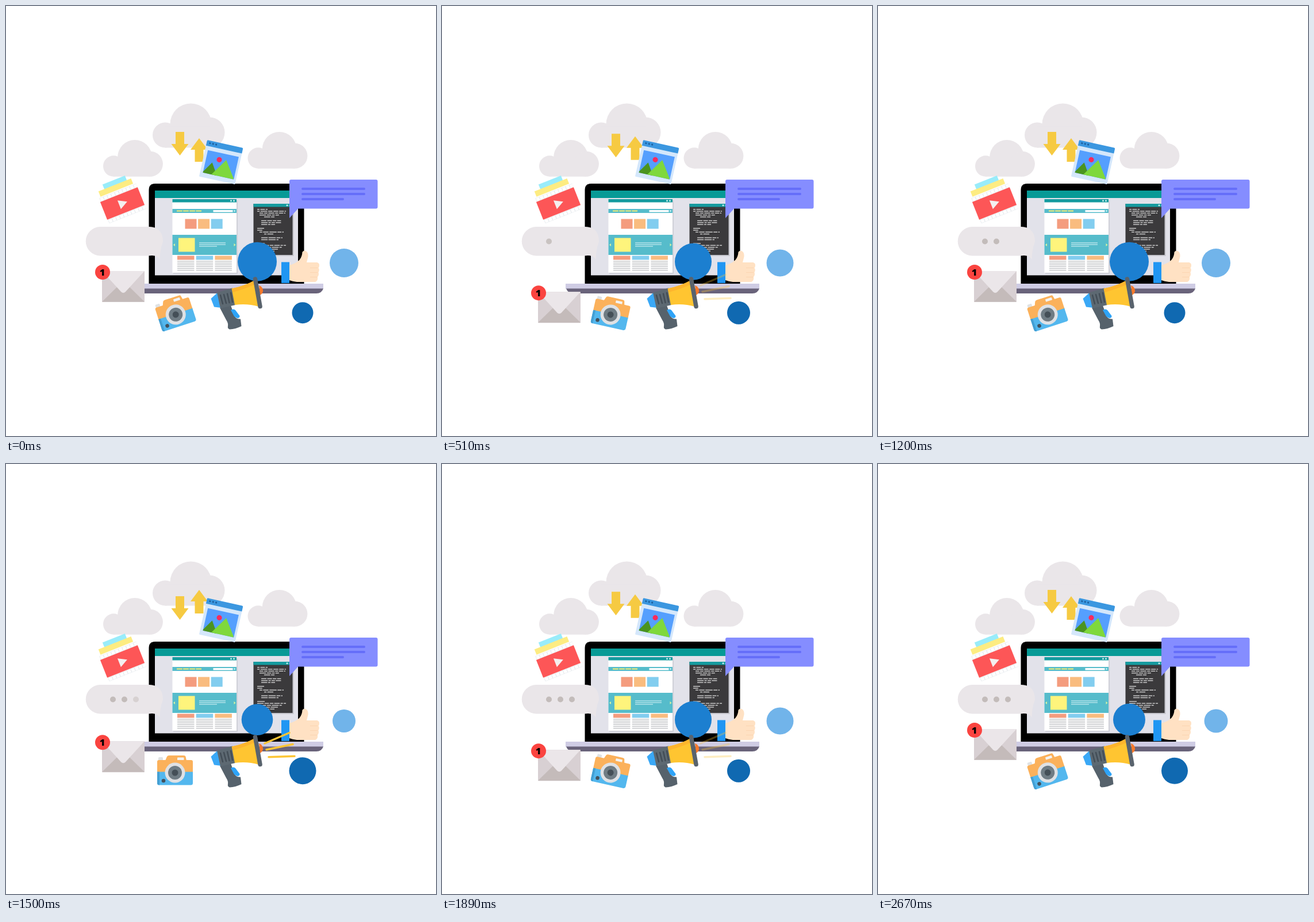
An HTML page for the animation above (2.7 s loop, 748x748 px).

```html
<!DOCTYPE html>
<html lang="en">
<head>
<meta charset="utf-8">
<title>Online marketing</title>
<style>
  html, body { margin: 0; width: 100%; height: 100%; overflow: hidden; background: #fff; }
  svg { display: block; width: 100vw; height: 100vh; }
</style>
</head>
<body>
<svg viewBox="0 0 748 748">
  <defs>
    <g id="cloud" fill="#eae6e9">
      <circle cx="22" cy="55" r="22"/><circle cx="66.500" cy="36" r="36"/><circle cx="99" cy="50.500" r="26.500"/>
      <rect x="22" y="40" width="77" height="37"/>
    </g>
    <path id="arrow" d="M-7.500 0H7.500V21H15L0 41L-15 21H-7.500Z" fill="#f6ca42"/>
  </defs>

  <use href="#cloud" x="255" y="169.500"/>
  <use href="#cloud" transform="translate(169 233) scale(.828)"/>
  <use href="#cloud" transform="translate(420.500 219) scale(.828)"/>
  <use id="down" href="#arrow"/>
  <use id="up" href="#arrow"/>

  <g id="laptop">
    <path d="M248.500 483.500V320Q248.500 309 259.500 309H507.500Q518.500 309 518.500 320V483.500Z"/>
    <rect x="259" y="321" width="249" height="147.500" fill="#e2e2ea"/>
    <rect x="259" y="321" width="249" height="13" fill="#079a96"/>
    <path d="M215 483H552V492H215Z" fill="#cfcce4"/>
    <path d="M216 491.500H552Q549 500 540 500H228Q219 500 216 491.500Z" fill="#69637a"/>
  </g>

  <g id="page">
    <rect x="291" y="338" width="112" height="128" fill="#cfd0d8"/>
    <rect x="289.500" y="336" width="111.500" height="128" fill="#fff"/>
    <rect x="289.500" y="336" width="111.500" height="5.500" fill="#159b9f"/>
    <circle cx="391.500" cy="338.700" r="1.500" fill="#c9f0ec"/><circle cx="396.500" cy="338.700" r="1.500" fill="#c9f0ec"/>
    <path d="M289.500 353H401V360H289.500ZM289.500 398H401V433H289.500Z" fill="#56bccb"/>
    <path d="M297 356.500H340" stroke="#f1ee76" stroke-width="2" stroke-dasharray="9.800 1.300"/>
    <rect x="360.500" y="355" width="34" height="3.500" fill="#fff"/>
    <circle cx="397.500" cy="356.500" r="1.300" fill="#dff"/>
    <rect x="300" y="403.500" width="28.500" height="24" fill="#fef47c"/>
    <path d="M294 413V418L291 415.500ZM396.500 413V418L399.500 415.500Z" fill="#d7f5a0"/>
    <path d="M336 412H382M336 415H382M336 418H367" stroke="#b5e4ea" stroke-width="1.300"/>
  </g>
  <g id="code">
    <rect x="432" y="346" width="68.500" height="89" fill="#c5c5cc"/>
    <rect x="430.500" y="344" width="68" height="89" fill="#3b3a3c"/>
    <rect x="430.500" y="344" width="68" height="5.500" fill="#159b9f"/>
    <circle cx="489" cy="346.700" r="1.500" fill="#c9f0ec"/><circle cx="494" cy="346.700" r="1.500" fill="#c9f0ec"/>
  </g>

  <g transform="translate(350 233) rotate(12.500)">
    <rect y="9" width="64" height="56" rx="1" fill="#d4e7fb"/>
    <path d="M2 0H62Q64 0 64 2V10H0V2Q0 0 2 0Z" fill="#3b97e0"/>
    <circle cx="6" cy="4.500" r="1.600" fill="#1d5f9e"/><circle cx="11.500" cy="4.500" r="1.600" fill="#1d5f9e"/><circle cx="17" cy="4.500" r="1.600" fill="#1d5f9e"/>
    <rect x="5" y="17" width="55" height="40" fill="#559ffe"/>
    <path d="M5 55L17 36.500L30 57H5Z" fill="#4b941f"/>
    <path d="M20 57L40 27L59 55V57Z" fill="#7fd83c"/>
    <circle cx="28" cy="29" r="4.600" fill="#f92b5d"/>
  </g>

  <g transform="translate(202.500 343.500) rotate(-21.700)">
    <rect x="-20" y="-43.500" width="42" height="10" fill="#99ecfa"/>
    <rect x="-31" y="-35" width="61" height="11" fill="#fdec82"/>
    <rect x="-35" y="-25" width="70" height="50" fill="#fff"/>
    <path d="M-34 -20H35M-34 20.500H35" stroke="#e9edf0" stroke-width="7"/>
    <path d="M-33 -20H35M-33 20.500H35" stroke="#fff" stroke-width="5.500" stroke-dasharray="5.500 1.500"/>
    <rect x="-35" y="-16.500" width="70" height="33" fill="#fd5657"/>
    <path d="M-6 -8L9 0L-6 8Z" fill="#f4efef"/>
  </g>

  <path d="M164 384H248Q273 384 273 410Q267 427 268 441Q262 432 248 434.500H164A25 25 0 0 1 164 384Z" fill="#eae6e9"/>
  <g id="dots" fill="#c3bcba">
    <circle cx="186" cy="409.500" r="5"/><circle cx="206" cy="409.500" r="5"/><circle cx="226" cy="409.500" r="5"/>
  </g>

  <path d="M496 302H643.500Q646.500 302 646.500 305V349.500Q646.500 352.500 643.500 352.500H508L493 369V305Q493 302 496 302Z" fill="#858dff"/>
  <path d="M516 318H623M516 327H623M516 336H586" stroke="#656ef9" stroke-width="4" stroke-linecap="round"/>

  <circle id="blue" cx="437" cy="444.700" fill="#1c7fd0"/>
  <circle id="sky" cx="588" cy="447" fill="#71b4ea"/>
  <circle id="navy" cx="516" cy="533.700" fill="#1069b1"/>

  <rect x="479" y="445.500" width="14" height="36.500" fill="#2096f3"/>
  <path d="M493 451Q505 448 511 441Q515 436 515.500 428Q518 424.500 522 426.500Q526 429 525.500 436L523 446H541Q545 447 545 451Q545 454 543.500 455.500Q546 459 543.500 463.500Q545 468 542 471.500Q543 478 538 480H506Q498 479 493 477Z" fill="#ffe1c3"/>
  <path d="M529 455.500H542M529 463.500H542M529 471.500H541" stroke="#fbd5b2" stroke-width="1"/>

  <path id="rays" d="M450 486L493 467.500M453 497L499 487.500M457 509.700L502 508.300" stroke="#fcc535" stroke-width="3.500" stroke-linecap="round"/>

  <g id="horn">
    <path d="M440 486Q446 488 447 494Q447.500 500 442 503Z" fill="#f5792c"/>
    <path d="M372 525L391 521L398 540Q401 545 408 544.500L409.500 557Q399 562 389 562.500Q385 561 386 557Q387 552 383 546Z" fill="#56626c"/>
    <path d="M391 529Q396 526 399 529L406.500 539Q407 543 402 543L397 540Z" fill="#2ea3f7"/>
    <path d="M368 498.500L375 525L362 523.500L356.500 509Z" fill="#3aa8f6"/>
    <path d="M367 498.500L394 490.500L399 520L373 526Z" fill="#5d6972"/>
    <path d="M373 503L377 518M379 502L383 517M385 500.500L388.500 516M391 499L394 515" stroke="#434d56" stroke-width="2.500" stroke-linecap="round"/>
    <path d="M392.500 491.500Q415 487 433 477L440 523Q420 517 398 520Z" fill="#ffc531"/>
    <path d="M393 491.500Q415 487 433 477L434 484Q416 492 394.500 498Z" fill="#feb52d"/>
    <path d="M433.500 475L442 522.500" stroke="#59636d" stroke-width="7.500" stroke-linecap="round"/>
  </g>

  <g id="mail">
    <rect x="167" y="461" width="74" height="54" rx="1" fill="#d8d0d3"/>
    <path d="M167 514.500L193 489H215L241 514.500Z" fill="#c4bbba"/>
    <path d="M167 461H241L208 497Q204 501 200 497Z" fill="#ebe6e9"/>
    <circle cx="168" cy="463" r="13" fill="#fa4440"/>
    <text x="167.500" y="469" text-anchor="middle" font-family="'Open Sans', sans-serif" font-weight="800" font-size="16.500">1</text>
  </g>

  <g id="camera">
    <rect x="265" y="510" width="8" height="8" rx="1.500" fill="#dfe2e4"/>
    <path d="M277 516L280 509Q281 507 284 507H309Q312 507 312.500 509L314 516Z" fill="#fbb15b"/>
    <rect x="298" y="510.500" width="11.500" height="5.500" rx="1" fill="#f2f3f4"/>
    <path d="M266 515H322Q325 515 325 518V537H263V518Q263 515 266 515Z" fill="#fbb15b"/>
    <path d="M263 535.500H325V555Q325 558.500 321.500 558.500H266.500Q263 558.500 263 555Z" fill="#53b7ee"/>
    <path d="M263 535.500H267V558.500Q263 558.500 263 555Z" fill="#449fd3"/>
    <circle cx="294" cy="537" r="17.500" fill="#dfe1e4"/>
    <circle cx="294" cy="537" r="12" fill="#6f7c84"/>
    <circle cx="294" cy="537" r="5.500" fill="#444f57"/>
    <circle cx="274" cy="551" r="3.300" fill="#43525e"/>
  </g>
</svg>
<script>
  const NS = 'http://www.w3.org/2000/svg';
  const $ = id => document.getElementById(id);
  const STEP = 30, STEPS = 90;

  function rect(parent, x, y, w, h, fill) {
    const r = document.createElementNS(NS, 'rect');
    Object.entries({ x, y, width: w, height: h, fill }).forEach(([k, v]) => r.setAttribute(k, v));
    $(parent).append(r);
  }

  function buildPage() {
    const hues = ['#f49c7e', '#f9bc7f', '#82cdef'];
    const heads = ['#f49c7e', '#82cdef', '#f9bc7f'];
    for (let i = 0; i < 3; i++) {
      rect('page', 311.5 + i * 22.6, 370.5, 20, 17, hues[i]);
      rect('page', 298 + i * 32.7, 434.5, 29.5, 7, heads[i]);
      for (let j = 0; j < 6; j++) rect('page', 298 + i * 32.7, 443.5 + j * 3.1, 29.5, 1.2, '#b9bbbe');
    }
  }

  function buildCode() {
    let seed = 11;
    const rnd = () => (seed = (seed * 16807) % 2147483647) / 2147483647;
    // Indent and length of each line; a zero length leaves a blank line
    const lines = [
      [0, 18], [0, 50], [4, 45], [4, 34], [12, 18], [0, 0], [7, 37], [7, 37], [7, 24], [0, 0],
      [0, 14], [0, 12], [4, 42], [12, 18], [0, 0], [7, 37], [7, 30], [0, 0], [0, 16], [0, 50],
      [4, 42], [12, 24], [12, 18]
    ];
    lines.forEach(([indent, length], i) => {
      let x = 437 + indent;
      const end = x + length;
      while (x < end - 2) {
        const w = Math.min(4 + rnd() * 9, end - x);
        rect('code', x, 353 + i * 3.3, w, 1.4, '#cfcfcf');
        x += w + 1.4;
      }
    });
  }

  const clamp = v => Math.max(0, Math.min(1, v));
  // Triangle wave: 0 at the start, 1 at half a period
  const swing = (n, period) => 1 - Math.abs(1 - 2 * (n % period) / period);
  const mix = (a, b, u) => a + (b - a) * u;

  function draw(ms) {
    const n = Math.floor(ms / STEP) % STEPS;
    const pulse = swing(n, 20);
    const quick = n < 80 ? pulse : 0;
    const slow = n < 80 ? swing(n, 40) : 0;

    $('down').setAttribute('transform', `translate(302.5 ${219 + 11 * quick})`);
    $('up').setAttribute('transform', `translate(336 ${271 - 11 * quick}) scale(1 -1)`);
    $('rays').setAttribute('opacity', quick);
    $('mail').setAttribute('transform', `translate(0 ${42.5 * slow})`);
    $('camera').setAttribute('transform', `rotate(${mix(-18, 18, slow)} 294 533)`);

    $('blue').setAttribute('r', mix(34, 27.3, pulse));
    $('sky').setAttribute('r', mix(25, 20, pulse));
    $('navy').setAttribute('r', mix(18.5, 23.5, pulse));
    [...$('dots').children].forEach((dot, i) => dot.setAttribute('opacity', clamp(n / 20 - i)));
  }

  buildPage();
  buildCode();
  const start = performance.now();
  function tick() {
    draw(performance.now() - start);
    requestAnimationFrame(tick);
  }
  draw(0);
  requestAnimationFrame(tick);
</script>
</body>
</html>
```
